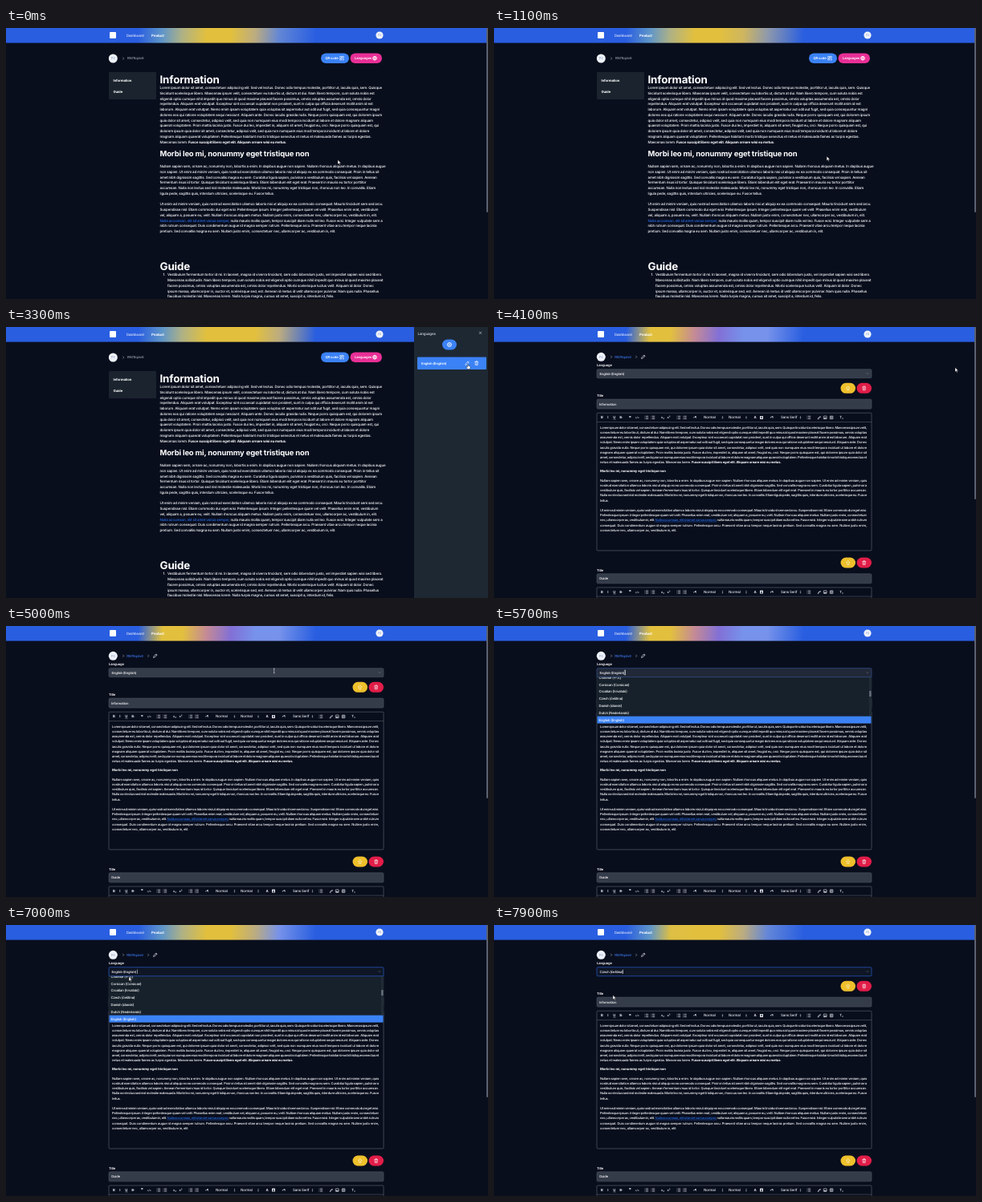
Recreate the animation shown at these times as an HTML page. Size 600 by 338 pixels, loop 8 s.

```html
<!DOCTYPE html>
<html lang="en">
<head>
<meta charset="utf-8">
<style>
html, body { margin: 0; width: 100%; height: 100%; overflow: hidden; background: #090e1d; }
svg { display: block; width: 100vw; height: 100vh; }
text { font-family: Inter, "Noto Sans CJK SC", sans-serif; text-rendering: geometricPrecision; white-space: pre; }
</style>
</head>
<body>
<script>
const NS = 'http://www.w3.org/2000/svg';
const BLUE = '#3b82f6', GREY = '#343b49', LINE = '#626976';

function add(parent, tag, attrs = {}) {
  const el = document.createElementNS(NS, tag);
  for (const k in attrs) el.setAttribute(k, attrs[k]);
  parent.append(el);
  return el;
}
const svg = add(document.body, 'svg', { viewBox: '0 0 600 338' });
const group = parent => add(parent || svg, 'g');
const rect = (g, x, y, width, height, fill, rx = 0, stroke = 'none') =>
  add(g, 'rect', { x, y, width, height, fill, rx, stroke, 'stroke-width': .6 });
const circle = (g, cx, cy, r, fill) => add(g, 'circle', { cx, cy, r, fill });
const path = (g, x, y, d, stroke = '#fff', width = .6, fill = 'none') =>
  add(g, 'path', { d, stroke, fill, 'stroke-width': width, 'stroke-linejoin': 'round', transform: `translate(${x} ${y})` });

// Text is laid out ten times larger and scaled down, for exact advances.
// *bold* and _link_ are marked inline; y is the middle of the line.
function text(g, x, y, size, str, fill = '#fff', weight = 500, track = -.037, link = '') {
  const el = add(g, 'text', {
    transform: `translate(${x} ${y + size * .35}) scale(.1)`, fill,
    'font-size': size * 10, 'font-weight': weight, 'letter-spacing': size * track * 10
  });
  for (const part of str.split(/(\*[^*]+\*|_[^_]+_)/)) {
    const span = add(el, 'tspan');
    span.textContent = part.replace(/[*_]/g, '');
    if (part[0] === '*') span.setAttribute('font-weight', 700);
    if (part[0] === '_') {
      span.setAttribute('fill', '#276ae4');
      if (link) span.setAttribute('text-decoration', link);
    }
  }
  return el;
}
function justify(el, width) {
  const gaps = el.textContent.split(' ').length - 1;
  el.style.wordSpacing = (width * 10 - el.getComputedTextLength()) / gaps + 'px';
}

// "|" breaks a line on the reading page, "/" in the editor.
const paragraphs = [
  'Lorem ipsum dolor sit amet, consectetuer adipiscing elit. Sed vel lectus. Donec odio tempus molestie, porttitor ut, iaculis quis, sem. Quisque |tincidunt scelerisque libero. Maecenas ipsum velit, /consectetuer eu lobortis ut, dictum at dui. Nam libero tempore, cum soluta nobis est |eligendi optio cumque nihil impedit quo minus id quod maxime placeat facere possimus, omnis voluptas /assumenda est, omnis dolor |repellendus. Aliquam erat volutpat. Excepteur sint occaecat cupidatat non proident, sunt in culpa qui officia deserunt mollit anim id est |laborum. Aliquam erat /volutpat. Nemo enim ipsam voluptatem quia voluptas sit aspernatur aut odit aut fugit, sed quia consequuntur magni |dolores eos qui ratione voluptatem sequi nesciunt. Aliquam ante. Donec /iaculis gravida nulla. Neque porro quisquam est, qui dolorem ipsum |quia dolor sit amet, consectetur, adipisci velit, sed quia non numquam eius modi tempora incidunt ut labore et dolore /magnam aliquam |quaerat voluptatem. Proin mattis lacinia justo. Fusce dui leo, imperdiet in, aliquam sit amet, feugiat eu, orci. Neque porro quisquam est, qui |dolorem ipsum quia dolor sit /amet, consectetur, adipisci velit, sed quia non numquam eius modi tempora incidunt ut labore et dolore |magnam aliquam quaerat voluptatem. Pellentesque habitant morbi tristique senectus et /netus et malesuada fames ac turpis egestas. |Maecenas lorem. *Fusce suscipit libero eget elit. Aliquam ornare wisi eu metus.*',
  'Nullam sapien sem, ornare ac, nonummy non, lobortis a enim. In dapibus augue non sapien. Nullam rhoncus aliquam metus. In dapibus augue |non sapien. Ut enim ad minim veniam, quis /nostrud exercitation ullamco laboris nisi ut aliquip ex ea commodo consequat. Proin in tellus sit |amet nibh dignissim sagittis. Sed convallis magna eu sem. Curabitur ligula sapien, pulvinar a /vestibulum quis, facilisis vel sapien. Aenean |fermentum risus id tortor. Quisque tincidunt scelerisque libero. Etiam bibendum elit eget erat. Praesent in mauris eu tortor porttitor |accumsan. /Nulla non lectus sed nisl molestie malesuada. Morbi leo mi, nonummy eget tristique non, rhoncus non leo. In convallis. Etiam |ligula pede, sagittis quis, interdum ultricies, scelerisque eu. Fusce /tellus.',
  'Ut enim ad minim veniam, quis nostrud exercitation ullamco laboris nisi ut aliquip ex ea commodo consequat. Mauris tincidunt sem sed arcu. |Suspendisse nisl. Etiam commodo dui eget wisi. /Pellentesque ipsum. Integer pellentesque quam vel velit. Phasellus enim erat, vestibulum |vel, aliquam a, posuere eu, velit. Nullam rhoncus aliquam metus. Nullam justo enim, consectetuer /nec, ullamcorper ac, vestibulum in, elit. |_Nulla accumsan, elit sit amet varius semper,_ nulla mauris mollis quam, tempor suscipit diam nulla vel leo. Fusce wisi. Integer vulputate sem a |nibh rutrum /consequat. Duis condimentum augue id magna semper rutrum. Pellentesque arcu. Praesent vitae arcu tempor neque lacinia |pretium. Sed convallis magna eu sem. Nullam justo enim, /consectetuer nec, ullamcorper ac, vestibulum in, elit.'
];
const guide = 'Vestibulum fermentum tortor id mi. In laoreet, magna id viverra tincidunt, sem odio bibendum justo, vel imperdiet sapien wisi sed libero.|Maecenas sollicitudin. Nam libero tempore, cum soluta nobis est eligendi optio cumque nihil impedit quo minus id quod maxime placeat|facere possimus, omnis voluptas assumenda est, omnis dolor repellendus. Morbi scelerisque luctus velit. Aliquam id dolor. Donec|ipsum massa, ullamcorper in, auctor et, scelerisque sed, est. Aenean id metus id velit ullamcorper pulvinar. Nam quis nulla. Phasellus|faucibus molestie nisl. Maecenas lorem. Nulla turpis magna, cursus sit amet, suscipit a, interdum id, felis.';
const subhead = 'Morbi leo mi, nonummy eget tristique non';
const code = 'RN76qziv6';

const linesOf = (str, mark, other) => str.replaceAll(other, '').split(mark).map(s => s.trim());
const readLines = (str, x, y) => linesOf(str, '|', '/').forEach((s, i) => text(view, x, y + i * 6.76, 4.5, s));
function editLines(str, y) {
  const lines = linesOf(str, '/', '|');
  lines.forEach((s, i) => {
    const el = text(editor, 132, y + i * 6.22, 4.1, s, '#fff', 500, -.037, 'underline');
    if (i < lines.length - 1) justify(el, 332);
  });
}

// Icons, centred on x, y
const pencil = (g, x, y) => path(g, x, y, 'M-2.2 2.2l.5-1.7 2.9-2.9 1.2 1.2-2.9 2.9zM.5-1.7l1.2 1.2');
const trash = (g, x, y) => path(g, x, y, 'M-2.2-1.5H2.2M-.8-1.6v-.8H.8v.8M-1.7-1.5l.3 4h2.8l.3-4M-.5-.3v1.8M.5-.3v1.8');
const chevron = (g, x, y) => path(g, x, y, 'M-.7-1.5L.8 0-.7 1.5', '#aeb4c0');
const avatar = (g, x, y, r) => {
  circle(g, x, y, r, '#eef2fb');
  text(g, x - r * .48, y, r * .75, 'PS', '#9aa8c8');
};

rect(svg, 0, 0, 600, 338, '#090e1d');

// Reading page
const view = group();
avatar(view, 133.3, 38, 5.5);
chevron(view, 146, 38);
text(view, 151, 38, 4.2, code, '#9aa1ae');
rect(view, 392, 31.5, 35, 12.5, BLUE, 6.25);
text(view, 397.5, 37.7, 4.2, 'QR code', '#fff', 600);
path(view, 418, 37.7, 'M-2.3-2.3h1.8v1.8h-1.8zM.5-2.3h1.8v1.8H.5zM-2.3.5h1.8v1.8h-1.8zM.5.5h.9v.9M2.3 1v1.3H.8');
const langButton = rect(view, 428.5, 31.5, 39.5, 12.5, '#e92f96', 6.25);
text(view, 434, 37.7, 4.2, 'Languages', '#fff', 600);
circle(view, 459, 37.7, 2.3, 'none').setAttribute('stroke', '#fff');
path(view, 459, 37.7, 'M-2.3 0H2.3M0-2.3Q-2 0 0 2.3Q2 0 0-2.3');
rect(view, 128, 55, 59, 34, '#1a232e', 1);
text(view, 133.5, 65.5, 4.3, 'Information', '#fff', 700);
text(view, 133.5, 79, 4.3, 'Guide', '#fff', 700);
text(view, 191.5, 64, 13.4, 'Information', '#fff', 700, -.012);
readLines(paragraphs[0], 191.5, 74.5);
text(view, 191.5, 156.8, 9.5, subhead, '#fff', 700, -.018);
readLines(paragraphs[1], 191.5, 172.5);
readLines(paragraphs[2], 191.5, 219.8);
text(view, 191.5, 297.5, 13.4, 'Guide', '#fff', 700, -.012);
text(view, 195.5, 307.8, 4.5, '1.');
readLines(guide, 201, 307.8);

// Editor page
const editor = group();
function toolbar(y, height) {
  rect(editor, 128, y - 5.7, 342, height, 'none', 1, LINE);
  rect(editor, 128, y + 5.2, 342, .5, LINE);
  const label = (x, s, weight = 500, size = 4.3) => text(editor, x, y, size, s, '#e8eaf0', weight);
  [[133, 'B'], [141.3, 'I'], [148.3, 'U'], [156.3, 'S'], [323.5, 'A']].forEach(([x, s]) => label(x, s, 700));
  path(editor, 150, y, 'M-1.7 2.3h3.4M6.2 0h4', '#e8eaf0', .4);
  label(168, '❞', 700, 5);
  label(175.5, '</>', 600, 3.2);
  [190, 198, 230, 237.5, 392].forEach(x =>
    path(editor, x, y, 'M-1-1.7h3.2M-1 0h3.2M-1 1.7h3.2M-2.4-1.7h.7M-2.4 0h.7M-2.4 1.7h.7', '#e8eaf0'));
  label(208, 'x₂', 600, 4);
  label(215.5, 'x²', 600, 4);
  label(248, '•¶', 700, 4);
  [[261, 'Normal'], [292, 'Normal'], [357, 'Sans Serif']].forEach(([x, s]) => label(x, s, 500, 4.5));
  [284.5, 314, 381.5].forEach(x => path(editor, x, y, 'M-.9-.5l.9-1.2.9 1.2zM-.9.5l.9 1.2.9-1.2z', 'none', 0, '#e8eaf0'));
  rect(editor, 331, y - 2, 4, 4, '#e8eaf0', .4);
  text(editor, 331.8, y, 3.5, 'A', '#090e1d', 700);
  label(343.5, '•¶', 700, 4);
  path(editor, 404.5, y, 'M-.4.4L1-1q1-1 .9.3L1 .4M.4-.4L-1 1q-1 1 .3.9L.4 1', '#e8eaf0', .7);
  rect(editor, 410.3, y - 1.8, 3.8, 3.6, 'none', .3, '#e8eaf0');
  path(editor, 412, y, 'M-1.6 1.5L-.3-.2.6.7 1.3 0 2 1.2z', 'none', 0, '#e8eaf0');
  rect(editor, 418.3, y - 1.8, 3.6, 3.6, 'none', .3, '#e8eaf0');
  path(editor, 420.1, y, 'M-.9-1.8V1.8M.9-1.8V1.8M-.9 0H.9', '#e8eaf0', .5);
  label(430.3, 'Tₓ', 600, 4.3);
}
function section(y, title, height) {
  rect(editor, 431.5, y - 6.5, 18.5, 13, '#efc02c', 6.5);
  path(editor, 440.7, y, 'M0-2.6L2.2-.2H1V2.4H-1V-.2H-2.2z', '#fff', .5);
  rect(editor, 451.5, y - 6.5, 18.5, 13, '#e11d48', 6.5);
  trash(editor, 460.7, y);
  text(editor, 128, y + 9.3, 4.2, 'Title', '#fff', 600);
  rect(editor, 128, y + 13.8, 342, 12, GREY, 1.5, '#4a515f');
  text(editor, 131, y + 19.8, 4.2, title);
  toolbar(y + 36.6, height);
}
avatar(editor, 133.3, 37.3, 5.5);
chevron(editor, 146, 37.3);
text(editor, 150.3, 37.3, 4.2, code, '#3b76e8');
chevron(editor, 177, 37.3);
pencil(editor, 185.7, 37.3);
text(editor, 128, 48, 4.2, 'Language', '#fff', 600);
section(76.3, 'Information', 171.7);
section(294, 'Guide', 171.7);
editLines(paragraphs[0], 125.2);
text(editor, 132, 179.8, 4.2, subhead, '#fff', 700, -.02);
editLines(paragraphs[1], 191.2);
editLines(paragraphs[2], 228.6);

// Language list; the field drawn above hides the upper half of the first row
const list = group(editor);
const ROW = 8.8, rowY = i => 64.2 + i * ROW;
rect(list, 128, 62, 342, 59.6, '#17212b', 0, '#2b3541');
const mark = rect(list, 128.5, 0, 341, ROW, BLUE);
['Chinese (中文)', 'Corsican (Corsican)', 'Croatian (hrvatski)', 'Czech (čeština)', 'Danish (dansk)', 'Dutch (Nederlands)', 'English (English)']
  .forEach((s, i) => text(list, 130.5, rowY(i), 4.3, s));
rect(list, 467, 64, 2.7, 48, '#222c37');
rect(list, 467.2, 81, 2.3, 7, '#6b7280', .5);
const field = rect(editor, 128, 52.7, 342, 11, GREY, 1.5);
path(editor, 465, 58, 'M-1.2-.6L0 .6 1.2-.6', '#8a92a0', .5);
const english = text(editor, 131.5, 58.2, 4.2, 'English (English)');
const czech = text(editor, 131.5, 58.2, 4.2, 'Czech (čeština)');
const caret = rect(editor, 163, 55.5, .5, 5.4, '#fff');

// Header with drifting colours
const stopX = [165, 195, 220, 250, 280, 310, 340, 385];
const palette = {
  b: [41, 94, 224], c: [96, 150, 200], g: [176, 178, 132], s: [98, 134, 214], t: [188, 172, 128],
  y: [226, 192, 62], p: [196, 138, 150], v: [130, 112, 214], l: [118, 146, 234]
};
const drift = [[0, 'bcgyytsb'], [2200, 'bcgyyytb'], [3300, 'bcgyyytb'], [4100, 'byypvllb'], [5700, 'byypvllb'], [7000, 'bcgyytlb'], [8000, 'bcyyytsb']];
const gradient = add(add(svg, 'defs'), 'linearGradient',
  { id: 'sky', gradientUnits: 'userSpaceOnUse', x1: 165, y1: 0, x2: 385, y2: 16 });
const stops = stopX.map(x => add(gradient, 'stop', { offset: (x - 165) / 220 }));
rect(svg, 0, 0, 600, 18.6, 'url(#sky)');
rect(svg, 129, 5, 8, 8, '#fff', 1);
text(svg, 150, 9.3, 4.4, 'Dashboard', '#e4eafa');
text(svg, 181, 9.3, 4.4, 'Product', '#fff', 700);
avatar(svg, 465, 9, 4.6);
const thumb = rect(svg, 598, 0, 2, 230, '#5a6070', 1);

// Side panel
const panel = group();
rect(panel, 508, 0, 92, 338, '#1e2833');
text(panel, 512.5, 8, 4.5, 'Languages', '#d5dae2');
path(panel, 590.5, 7.3, 'M-1.5-1.5L1.5 1.5M1.5-1.5L-1.5 1.5', '#d5dae2');
rect(panel, 543, 15.5, 18, 13, BLUE, 6.5);
circle(panel, 552, 22, 2.4, 'none').setAttribute('stroke', '#fff');
path(panel, 552, 22, 'M-1.2 0H1.2M0-1.2V1.2');
rect(panel, 512, 37.5, 86, 15.5, BLUE, 1);
text(panel, 517, 45.2, 4.2, 'English (English)', '#fff', 600);
pencil(panel, 574, 45.2);
trash(panel, 585.7, 45);

// Pointer shapes
const pointer = group();
const arrow = path(pointer, 0, -2.5, 'M0 0v5.4l1.3-1.1.9 2 .9-.4-.9-1.9h1.7z', '#111', .4, '#fff');
const hand = path(pointer, 0, -2.5, 'M-.6 0q.6-.6 1.1 0v2l2 .5q.7.3.5 1.2L2.5 6H-.5L-2.2 3.6q.3-.8 1.6.1z', '#111', .4, '#fff');
const beam = path(pointer, 0, 0, 'M-.8-2.8H.8M0-2.8V2.8M-.8 2.8H.8', '#fff', .5);
const route = [
  [0, 413, 167], [1000, 413, 167], [1900, 447, 40], [2600, 447, 40], [3100, 575, 49], [3800, 575, 49],
  [4050, 574, 53], [4500, 574, 53], [5400, 163, 58], [6600, 163, 58], [6950, 153, 67], [7100, 153, 67],
  [7500, 148, 90], [8000, 148, 90]
];

const clamp = v => Math.min(1, Math.max(0, v));
const ease = v => v * v * (3 - 2 * v);
const mix = (a, b, p) => a.map((v, i) => v + (b[i] - v) * p);
const rgb = c => `rgb(${c.map(Math.round)})`;
const show = (el, on) => el.setAttribute('display', on ? 'inline' : 'none');
function between(keys, t) {
  let i = 0;
  while (i < keys.length - 2 && t >= keys[i + 1][0]) i++;
  const [a, b] = [keys[i], keys[i + 1]];
  return [a, b, clamp((t - a[0]) / (b[0] - a[0]))];
}

function draw(now) {
  const t = now % 8000;
  const editing = t >= 3800, focused = t >= 5600, chosen = t >= 7700;
  const open = focused && !chosen;

  const [from, to, p] = between(drift, t);
  stops.forEach((stop, i) =>
    stop.setAttribute('stop-color', rgb(mix(palette[from[1][i]], palette[to[1][i]], p))));

  show(view, !editing);
  show(editor, editing);
  thumb.setAttribute('height', editing ? 215 : 230);

  const [a, b, q] = between(route, t);
  const [, x, y] = mix(a, b, ease(q));
  pointer.setAttribute('transform', `translate(${x} ${y})`);
  const overLang = !editing && x > 428 && x < 468 && y < 44;
  const overField = editing && x < 470 && y < 63;
  const overHand = overLang || (!editing && t > 2900);
  show(hand, overHand);
  show(beam, overField);
  show(arrow, !overHand && !overField);
  langButton.setAttribute('fill', overLang ? '#f062b2' : '#e92f96');

  show(panel, t >= 2350 && !editing);
  panel.setAttribute('transform', `translate(${92 * (1 - ease(clamp((t - 2350) / 300)))} 0)`);

  const fade = clamp((t - 5600) / 200);
  field.setAttribute('fill', rgb(mix([52, 59, 73], [15, 22, 38], fade)));
  field.setAttribute('stroke', rgb(mix([74, 81, 95], [45, 105, 225], fade)));
  show(list, open);
  mark.setAttribute('y', rowY(t > 7100 ? Math.max(1, Math.round((y - 64.2) / ROW)) : 6) - ROW / 2);
  show(english, !chosen);
  show(czech, chosen);
  caret.setAttribute('x', chosen ? 160.5 : 163);
  show(caret, focused);
}
(function loop() {
  draw(performance.now());
  requestAnimationFrame(loop);
})();
</script>
</body>
</html>
```
